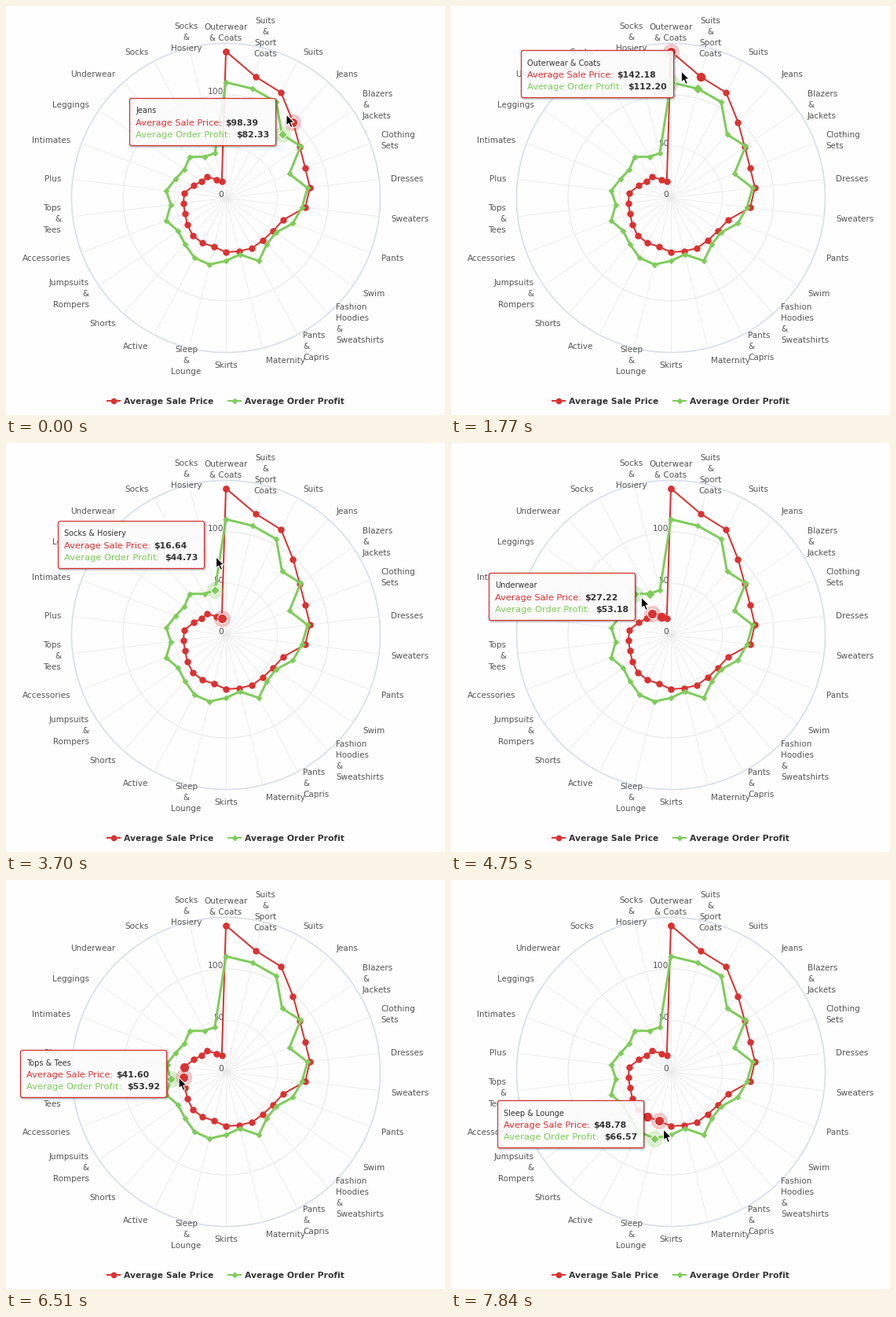
A matplotlib script that plays this animation: 559 px wide and 520 px high, repeating every 7990 ms.

```python
import numpy as np
import matplotlib.pyplot as plt
from matplotlib.animation import FuncAnimation
from matplotlib.patches import Circle, FancyBboxPatch, Polygon

W, H, DPI = 559, 520, 100
PX = 72 / DPI                      # points per pixel
LOOP, INTERVAL = 7990, 47
STEPS = 54                         # pointer positions in one loop
STEP = LOOP / STEPS

CX, CY, SCALE = 280, 244, 1.31     # pixels per unit of value
RED, GREEN, GREY, DARK = "#da3232", "#7fcc5b", "#555555", "#333333"

LABELS = """Outerwear|& Coats; Suits|&|Sport|Coats; Suits; Jeans;
Blazers|&|Jackets; Clothing|Sets; Dresses; Sweaters; Pants; Swim;
Fashion|Hoodies|&|Sweatshirts; Pants|&|Capris; Maternity; Skirts;
Sleep|&|Lounge; Active; Shorts; Jumpsuits|&|Rompers; Accessories;
Tops|&|Tees; Plus; Intimates; Leggings; Underwear; Socks;
Socks|&|Hosiery""".replace("\n", " ").split("; ")
PRICE = [142.18, 121.07, 115.42, 98.39, 87.21, 82.40, 82.27, 77.68, 59.73,
         55.94, 54.61, 55.02, 53.30, 52.67, 48.78, 49.23, 48.70, 45.54, 42.51,
         41.60, 40.72, 33.43, 28.57, 27.22, 20.24, 16.64]
PROFIT = [112.20, 109.13, 105.21, 82.33, 88.32, 65.94, 79.91, 74.60, 69.62,
          59.13, 60.04, 69.03, 56.51, 61.12, 66.57, 65.63, 60.02, 56.43, 62.08,
          53.92, 58.41, 52.21, 48.87, 53.18, 45.07, 44.73]
COUNT = len(LABELS)
ANGLE = 2 * np.pi * np.arange(COUNT) / COUNT

# pointer key points: time, x, y
PATH = np.array([
    (-150, 361, 147), (0, 357, 138), (1035, 331, 100), (1900, 287, 80),
    (2500, 274, 97), (3260, 274, 97), (4150, 261, 194), (4450, 261, 194),
    (4740, 242, 196), (5775, 228, 224), (6700, 218, 258), (6960, 226, 275),
    (7840, 270.5, 317),
]).T
LINGER = 4                         # steps a left marker stays enlarged
ARROW = np.array([(0, 0), (0, 14), (3.2, 11.2), (5.6, 16.6), (8, 15.5),
                  (5.7, 10.2), (10, 10)])


def polar(r):
    return CX + r * np.sin(ANGLE), CY - r * np.cos(ANGLE)


def pointer_at(step):
    return [np.interp(step * STEP, PATH[0], PATH[axis]) for axis in (1, 2)]


def hovered(step):
    """Category whose spoke is closest in angle to the pointer."""
    x, y = pointer_at(step)
    turn = np.arctan2(x - CX, CY - y) / (2 * np.pi) % 1
    return min(round(turn * COUNT), COUNT - 1)


fig = plt.figure(figsize=(W / DPI, H / DPI), dpi=DPI, facecolor="#fefefe")
ax = fig.add_axes([0, 0, 1, 1])
ax.set_xlim(0, W)
ax.set_ylim(H, 0)
ax.axis("off")


def text(x, y, s, size, color=GREY, **kw):
    return ax.text(x, y, s, fontsize=size * PX, color=color,
                   family="DejaVu Sans", va="baseline", **kw)


def line(x, y, color, width, z=1, **kw):
    return ax.plot(x, y, color=color, lw=width * PX, zorder=z, **kw)[0]


def dots(marker, color, size, z, edge="none", alpha=1):
    return ax.plot([], [], ls="", marker=marker, mfc=color, mec=edge,
                   mew=PX, ms=size * PX, alpha=alpha, zorder=z)[0]


# grid
for value, color, width in ((50, "#ebebeb", 1), (100, "#e6e6e6", 1),
                            (150, "#d6deea", 1.6)):
    ax.add_patch(Circle((CX, CY), value * SCALE, fill=False, ec=color,
                        lw=width * PX, zorder=1))
for x, y in zip(*polar(150 * SCALE)):
    line([CX, x], [CY, y], "#ebebeb", 0.9)
for value in (0, 50, 100):
    text(CX - 2.5, CY - value * SCALE - 1, str(value), 10.6, ha="right",
         zorder=2)

# category names just outside the rim
for label, deg, x, y in zip(LABELS, np.degrees(ANGLE), *polar(150 * SCALE + 15)):
    side = "left" if 20 < deg < 170 else "right" if 200 < deg < 340 else "center"
    rows = label.split("|")
    for i, row in enumerate(rows):
        text(x, y + 4.8 + 14 * (i - (len(rows) - 1) / 2), row, 10.35,
             ha=side, zorder=2)

# series and legend
SERIES = []
for values, color, marker, size, width, name, lx, z in (
        (PRICE, RED, "o", 8.4, 2, "Average Sale Price", 129, 3),
        (PROFIT, GREEN, "D", 6, 3, "Average Order Profit", 283, 5)):
    x, y = polar(SCALE * np.array(values))
    line(np.append(x, x[0]), np.append(y, y[0]), color, width, z,
         marker=marker, ms=size * PX, mec="none", solid_joinstyle="round")
    line([lx, lx + 8, lx + 16], [502] * 3, color, 2, z, markevery=[1],
         marker=marker, ms=size * 0.92 * PX, mec="none")
    text(lx + 21, 506.5, name, 10.8, DARK, weight="bold")
    halo = dots("o", color, 21, z + 0.2, alpha=0.28)
    big = dots(marker, color, size * 1.35, z + 0.3)
    active = dots(marker, color, size * 1.45, z + 0.4, edge="white")
    SERIES.append((x, y, halo, big, active))

# tooltip
TIP_H = 60


def tip_box(z, **kw):
    box = FancyBboxPatch((0, 0), 186, TIP_H, zorder=z,
                         boxstyle="round,pad=0,rounding_size=2.5", **kw)
    return ax.add_patch(box)


shadows = [tip_box(8, fill=False, ec="black", alpha=a, lw=w * PX)
           for w, a in ((5, 0.05), (3, 0.10), (1, 0.15))]
panel = tip_box(9, fc=(0.985, 0.985, 0.985, 0.9), ec=RED, lw=1.2 * PX)


def tip_text(size, color, s="", **kw):
    return text(0, 0, s, size, color, zorder=10, **kw)


title = tip_text(9.8, DARK)
price, profit = (tip_text(10.9, DARK, weight="bold") for _ in range(2))
# text with its offset from the panel's corner
TIP_TEXT = [
    (title, 7.5, 19),
    (tip_text(11.4, RED, "Average Sale Price:"), 7.5, 34.5),
    (price, 121.5, 34.5),
    (tip_text(11.5, GREEN, "Average Order Profit:"), 7.5, 49.5),
    (profit, 135.5, 49.5),
]
pointer = ax.add_patch(Polygon(ARROW, closed=True, fc="black", ec="white",
                               lw=1.1 * PX, zorder=12))


def update(k):
    step = min(int((k * INTERVAL + 50) / STEP), STEPS - 1)
    cat = hovered(step)
    recent = (hovered(step - back) for back in range(1, LINGER))
    last = [next((c for c in recent if c != cat), cat)]
    for x, y, halo, big, active in SERIES:
        halo.set_data([x[cat]], [y[cat]])
        active.set_data([x[cat]], [y[cat]])
        big.set_data(x[last], y[last])

    title.set_text(LABELS[cat].replace("|", " "))
    price.set_text(f"\\${PRICE[cat]:.2f}")
    profit.set_text(f"\\${PROFIT[cat]:.2f}")

    # the tooltip trails the pointer by one step
    x, y = pointer_at(step - 1)
    width = 194 if PROFIT[cat] >= 100 else 186
    left, top = round(x - 17 - width) - 0.5, round(y - TIP_H / 2) + 0.5
    for box, shift in [(s, 1) for s in shadows] + [(panel, 0)]:
        box.set_bounds(left + shift, top + shift, width, TIP_H)
    for item, dx, dy in TIP_TEXT:
        item.set_position((left + dx, top + dy))
    pointer.set_xy(ARROW + pointer_at(step))
    return []


anim = FuncAnimation(fig, update, frames=LOOP // INTERVAL, interval=INTERVAL,
                     init_func=lambda: update(0), repeat=True, repeat_delay=0)
plt.show()
```
